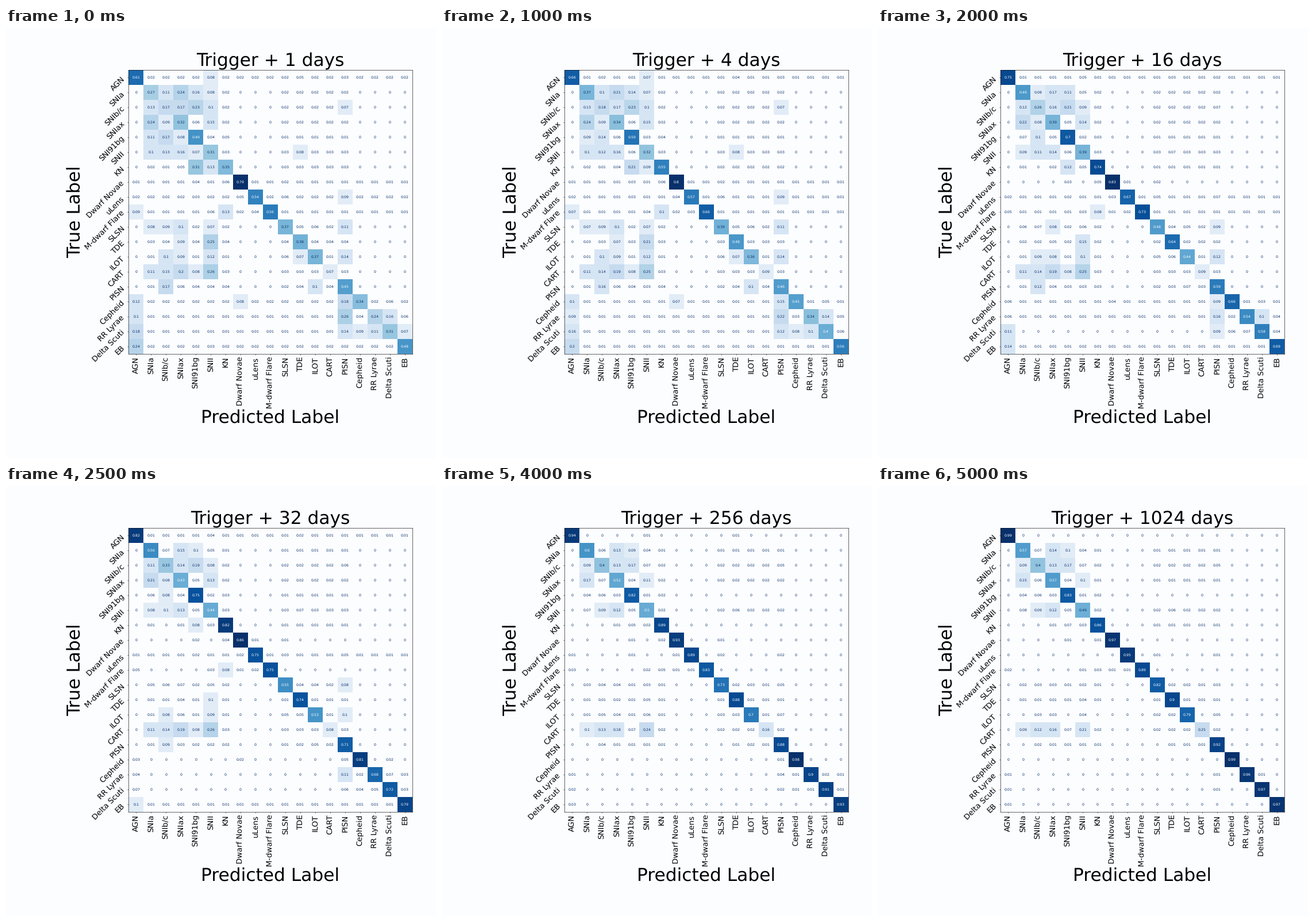
Recreate the animation shown at these times as a matplotlib script. Size 748 by 748 pixels, loop 5500 ms.

```python
import numpy as np
import matplotlib.pyplot as plt
from matplotlib.animation import FuncAnimation
from matplotlib.colors import to_rgb

SIZE, DPI = 748, 88
STEPS = 11                      # 1, 2, 4 ... 1024 days
PAPER, INK, PALE = "#fcfdff", "#08306b", "#f7fbff"
LEFT, TOP, SIDE = 213.18, 73.1, 493.68
KNOTS = (0, 3, 6, 10)

# class: hit rate at the knots, share of misses taken by the first
# lookalike, falloff to each next one, lookalikes
CLASSES = {
    "AGN": (61, 69, 88, 99, 0.21, 0.6, "SNII, TDE, PISN, SNIb/c"),
    "SNIa": (27, 42, 63, 57, 0.33, 0.68, "SNIax, SNI91bg, SNIb/c, SNII"),
    "SNIb/c": (17, 19, 40, 40, 0.28, 0.75, "SNI91bg, SNIax, SNIa, SNII, PISN"),
    "SNIax": (32, 35, 47, 57, 0.36, 0.62, "SNIa, SNII, SNIb/c, SNI91bg"),
    "SNI91bg": (49, 64, 81, 83, 0.33, 0.68, "SNIb/c, SNIa, SNIax, KN, SNII"),
    "SNII": (31, 33, 50, 49, 0.23, 0.8, "SNIax, SNIb/c, SNIa, TDE, SNI91bg"),
    "KN": (35, 65, 91, 86, 0.47, 0.42, "SNI91bg, SNII, SNIax, SNIa, SNIb/c"),
    "Dwarf Novae": (79, 80, 89, 97, 0.28, 0.6, "KN, SNI91bg, SLSN, uLens"),
    "uLens": (54, 59, 83, 95, 0.2, 0.7, "PISN, SLSN, Dwarf Novae, SNI91bg, AGN"),
    "M-dwarf Flare": (56, 71, 77, 89, 0.3, 0.65, "KN, AGN, SNII, uLens, Dwarf Novae"),
    "SLSN": (37, 40, 63, 82, 0.18, 0.88, "PISN, SNIax, SNIb/c, SNIa, SNII, ILOT, TDE"),
    "TDE": (38, 53, 85, 90, 0.4, 0.36, "SNII, SNIax, SNIa"),
    "ILOT": (37, 36, 61, 79, 0.22, 0.85, "PISN, SNII, SNIb/c, SNIax, TDE, SLSN"),
    "CART": (7, 10, 7, 25, 0.28, 0.75, "SNII, SNIax, SNIb/c, SNIa, SNI91bg"),
    "PISN": (45, 47, 83, 92, 0.3, 0.6, "SNIb/c, ILOT, SNIax, SNII, SLSN, SNIa"),
    "Cepheid": (34, 50, 97, 99, 0.27, 0.68, "PISN, AGN, Dwarf Novae, Delta Scuti"),
    "RR Lyrae": (24, 39, 83, 96, 0.34, 0.62, "PISN, Delta Scuti, AGN, EB, Cepheid"),
    "Delta Scuti": (31, 45, 85, 97, 0.26, 0.8, "AGN, PISN, RR Lyrae, Cepheid, EB"),
    "EB": (48, 60, 88, 97, 0.46, 0.13, "AGN, SNII"),
}
LABELS = list(CLASSES)
N = len(LABELS)
CELL = SIDE / N
TRANSIENTS = LABELS[1:7] + LABELS[10:15]


def miss_shares(name, head, falloff, lookalikes):
    """How one class's misses split over all classes; the rest spreads evenly."""
    shares = {other: head * falloff ** k for k, other in enumerate(lookalikes)}
    pool = TRANSIENTS if name in TRANSIENTS else LABELS
    rest = [c for c in pool if c != name and c not in shares]
    even = (1 - sum(shares.values())) / len(rest)
    shares.update(dict.fromkeys(rest, even))
    return np.array([shares.get(c, 0) for c in LABELS])


percent = np.zeros((STEPS, N, N))
for i, (name, (*keys, head, falloff, others)) in enumerate(CLASSES.items()):
    hits = np.interp(range(STEPS), KNOTS, keys)
    percent[:, i] = np.outer(100 - hits, miss_shares(name, head, falloff, others.split(", ")))
    percent[:, i, i] = hits
percent = np.floor(percent + 0.5)


def px(n):
    return n * 72 / DPI


def shades(level):
    """Blues with the palest tones merged into flat steps."""
    tone = np.select([level < 0.118, level < 0.215, level < 0.28],
                     [0.11, 0.165, 0.245], level)
    rgb = plt.cm.Blues(tone)[..., :3]
    rgb[level < 0.085] = to_rgb(PAPER)
    return rgb


plt.rcParams.update({"font.family": "DejaVu Sans", "text.hinting": "none"})
fig = plt.figure(figsize=(SIZE / DPI, SIZE / DPI), dpi=DPI, facecolor=PAPER)
ax = fig.add_axes([LEFT / SIZE, 1 - (TOP + SIDE) / SIZE, SIDE / SIZE, SIDE / SIZE])
grid = ax.imshow(shades(percent[0]), interpolation="nearest", aspect="auto")
ax.set_xticks(range(N), LABELS, rotation=90, fontsize=px(13.2))
ax.set_yticks(range(N), [""] * N)
ax.tick_params(length=px(2.4), pad=px(2.4), width=px(0.55))
for spine in ax.spines.values():
    spine.set_linewidth(px(0.6))


def label(x, y, text, size, **style):
    return fig.text(x / SIZE, 1 - y / SIZE, text, fontsize=px(size),
                    rotation_mode="anchor", va="baseline", **style)


for i, name in enumerate(LABELS):
    label(206.8, TOP + (i + 0.5) * CELL + 2.9, name, 13.2, ha="right", rotation=45)
mid_x, mid_y = LEFT + SIDE / 2, TOP + SIDE / 2
title = label(mid_x, 66.7, "", 31.3, ha="center")
label(mid_x, 686.4, "Predicted Label", 31.3, ha="center")
label(129, mid_y, "True Label", 31.3, ha="center", rotation=90)
numbers = [[ax.text(c, r, "", fontsize=px(6.2), ha="center", va="center")
            for c in range(N)] for r in range(N)]


def update(step):
    values = percent[step]
    top = values.max()
    title.set_text(f"Trigger + {2 ** step} days")
    grid.set_data(shades(values / top))
    for texts, line in zip(numbers, values):
        for text, v in zip(texts, line):
            text.set_text(f"{v / 100:g}")
            text.set_color(PALE if v >= top / 2 else INK)
    return []


anim = FuncAnimation(fig, update, frames=STEPS, interval=500, repeat=True,
                     repeat_delay=0, blit=False)
plt.show()
```
